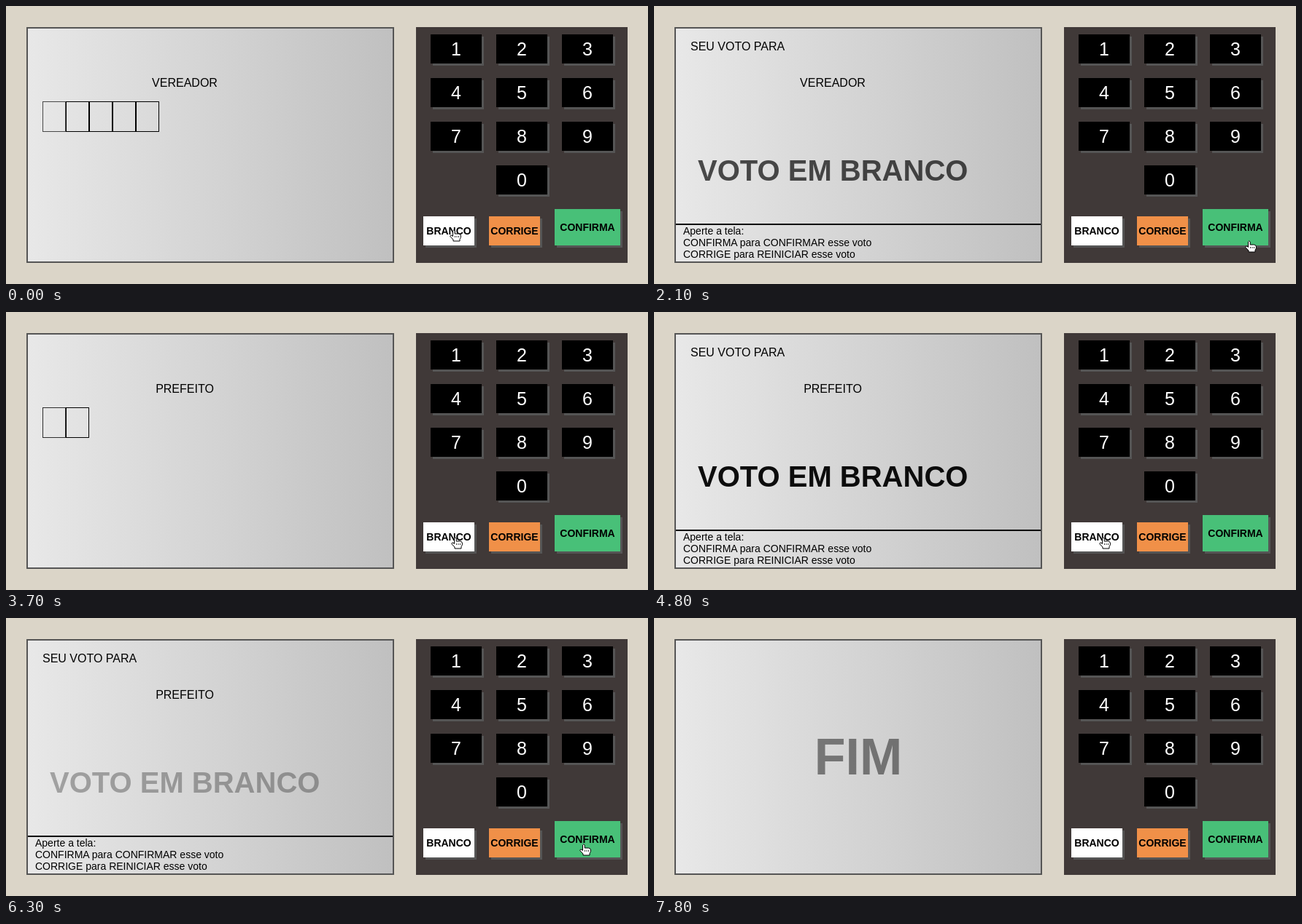
An HTML page for the animation above (8000 ms loop, 880 by 382 pixels).

```html
<!DOCTYPE html>
<html lang="pt">
<head>
<meta charset="utf-8">
<title>Urna</title>
<style>
html, body { margin: 0; width: 100%; height: 100%; overflow: hidden; background: #dbd5c8; }
svg { display: block; font-family: "Liberation Sans", Arial, sans-serif; cursor: default; }
.mid { text-anchor: middle; }
.digit { font-size: 25px; fill: #fff; }
.action { font-size: 14px; font-weight: bold; }
.label { font-size: 16px; }
.hint { font-size: 14px; }
.notice { font-size: 40px; font-weight: bold; }
.end { font-size: 70px; font-weight: bold; }
.cell { fill: none; stroke: #000; }
</style>
</head>
<body>
<svg width="880" height="382" viewBox="0 0 880 382">
  <defs>
    <linearGradient id="glass"><stop stop-color="#e8e8e8"/><stop offset="1" stop-color="#c0c0c0"/></linearGradient>
  </defs>
  <rect x="29" y="30" width="502" height="322" fill="url(#glass)" stroke="#555" stroke-width="2"/>
  <g id="typing"></g>
  <g id="vote">
    <text class="label" x="50" y="61">SEU VOTO PARA</text>
    <text class="notice blink" x="60" y="240">VOTO EM BRANCO</text>
    <rect x="30" y="299" width="500" height="2"/>
    <text class="hint" x="40" y="314">Aperte a tela:</text>
    <text class="hint" x="40" y="330">CONFIRMA para CONFIRMAR esse voto</text>
    <text class="hint" x="40" y="346">CORRIGE para REINICIAR esse voto</text>
  </g>
  <text id="office" class="label mid" x="245" y="111"></text>
  <text id="end" class="end mid blink" x="280" y="215">FIM</text>
  <rect x="562" y="29" width="290" height="324" fill="#403938"/>
  <g id="keys"></g>
  <g id="cursor" fill="#fff" stroke="#000">
    <g id="hand">
      <path d="M4.5 9.5V2Q5.8-.4 7.2 2V6H12.5Q15.5 6.3 15.5 9Q15.5 12 14 13.5V16H5V14L.8 9.6Q1 7.3 3 8.2Z"/>
      <path d="M7.5 9v2M10 9v2M12.5 9v2" stroke-width=".8"/>
    </g>
    <path id="arrow" d="M.5 .5V14L3.7 11 6 16 8 15 5.8 10.3H10Z"/>
  </g>
</svg>
<script>
const LOOP = 8000, FRAME = 100;
const $ = id => document.getElementById(id);
const show = (el, on) => el.style.display = on ? '' : 'none';

// Keypad
const keys = [];
const addKey = (label, x, y, w, h, fill, type) => {
  keys.push({ x, y, w, h });
  const size = `width="${w}" height="${h}"`;
  $('keys').innerHTML += `<rect x="${x + 3}" y="${y + 3}" ${size} fill="#555"/>
    <rect x="${x}" y="${y}" ${size} fill="${fill}"/>
    <text class="mid ${type}" x="${x + w / 2}" y="${y + h / 2 + (type === 'digit' ? 9 : 5)}">${label}</text>`;
};
for (let i = 0; i < 9; i++) addKey(i + 1, 582 + i % 3 * 90, 39 + Math.floor(i / 3) * 60, 70, 40, '#000', 'digit');
addKey(0, 672, 219, 70, 40, '#000', 'digit');
addKey('BRANCO', 572, 289, 70, 40, '#fff', 'action');
addKey('CORRIGE', 662, 289, 70, 40, '#f09048', 'action');
addKey('CONFIRMA', 752, 279, 90, 50, '#48c078', 'action');

for (let i = 0; i < 5; i++)
  $('typing').innerHTML += `<rect class="cell${i ? '' : ' blink'}" x="${50.5 + 32 * i}" y="131.5" width="31" height="41"/>`;
const cells = [...$('typing').children];
const blinkers = document.querySelectorAll('.blink');

// CSS "ease" curve, solved by bisection
function ease(p) {
  if (p <= 0 || p >= 1) return p <= 0 ? 0 : 1;
  let lo = 0, hi = 1;
  for (let i = 0; i < 24; i++) {
    const s = (lo + hi) / 2, x = .75 * s * (1 - s) + s ** 3;
    if (x < p) lo = s; else hi = s;
  }
  return .3 * lo * (1 - lo) ** 2 + 3 * lo * lo * (1 - lo) + lo ** 3;
}

// One-second fades: [active from, fade start]
const fades = [[0, -400], [600, 625], [1700, 1700], [3700, 3200], [4100, 4100], [5100, 5100],
  [5600, 5200], [6100, 6100], [6500, 6530], [6700, 6630], [7700, 7530]];
const opacity = t => ease((t - fades.findLast(f => t >= f[0])[1]) / 1000);

// Pointer path: [time, x, y]
const path = [[0, 608, 307], [1400, 608, 307], [2100, 810, 322], [2200, 810, 322], [2300, 808, 322],
  [3699, 808, 322], [3700, 610, 309], [4800, 610, 309], [4900, 611, 309], [5500, 786, 310],
  [6700, 786, 310], [6900, 763, 303], [7400, 78, 16], [LOOP, 78, 16]];
function pointer(t) {
  const i = path.findLastIndex(p => t >= p[0]);
  const [t0, x0, y0] = path[i], [t1, x1, y1] = path[i + 1];
  const u = (t - t0) / (t1 - t0), s = u * u * (3 - 2 * u);
  return [x0 + (x1 - x0) * s, y0 + (y1 - y0) * s].map(Math.round);
}

function draw(t) {
  const end = t >= 6500, mayor = t >= 3700;
  const vote = !end && (mayor ? t >= 4100 : t >= 600);
  show($('vote'), vote);
  show($('typing'), !vote && !end);
  show($('office'), !end);
  show($('end'), end);
  $('office').textContent = mayor ? 'PREFEITO' : 'VEREADOR';
  cells.forEach((c, i) => show(c, i < (mayor ? 2 : 5)));
  const o = opacity(t);
  blinkers.forEach(b => b.style.opacity = o);

  const [x, y] = pointer(t), tip = x + 5;
  const over = keys.some(k => tip >= k.x && tip < k.x + k.w && y >= k.y && y < k.y + k.h);
  $('cursor').setAttribute('transform', `translate(${x} ${y})`);
  show($('cursor'), t < 7500);
  show($('hand'), over);
  show($('arrow'), !over);
}

const began = performance.now();
function tick() {
  const t = (performance.now() - began) % LOOP;
  draw(Math.floor(t / FRAME) * FRAME);
  requestAnimationFrame(tick);
}
tick();
</script>
</body>
</html>
```
